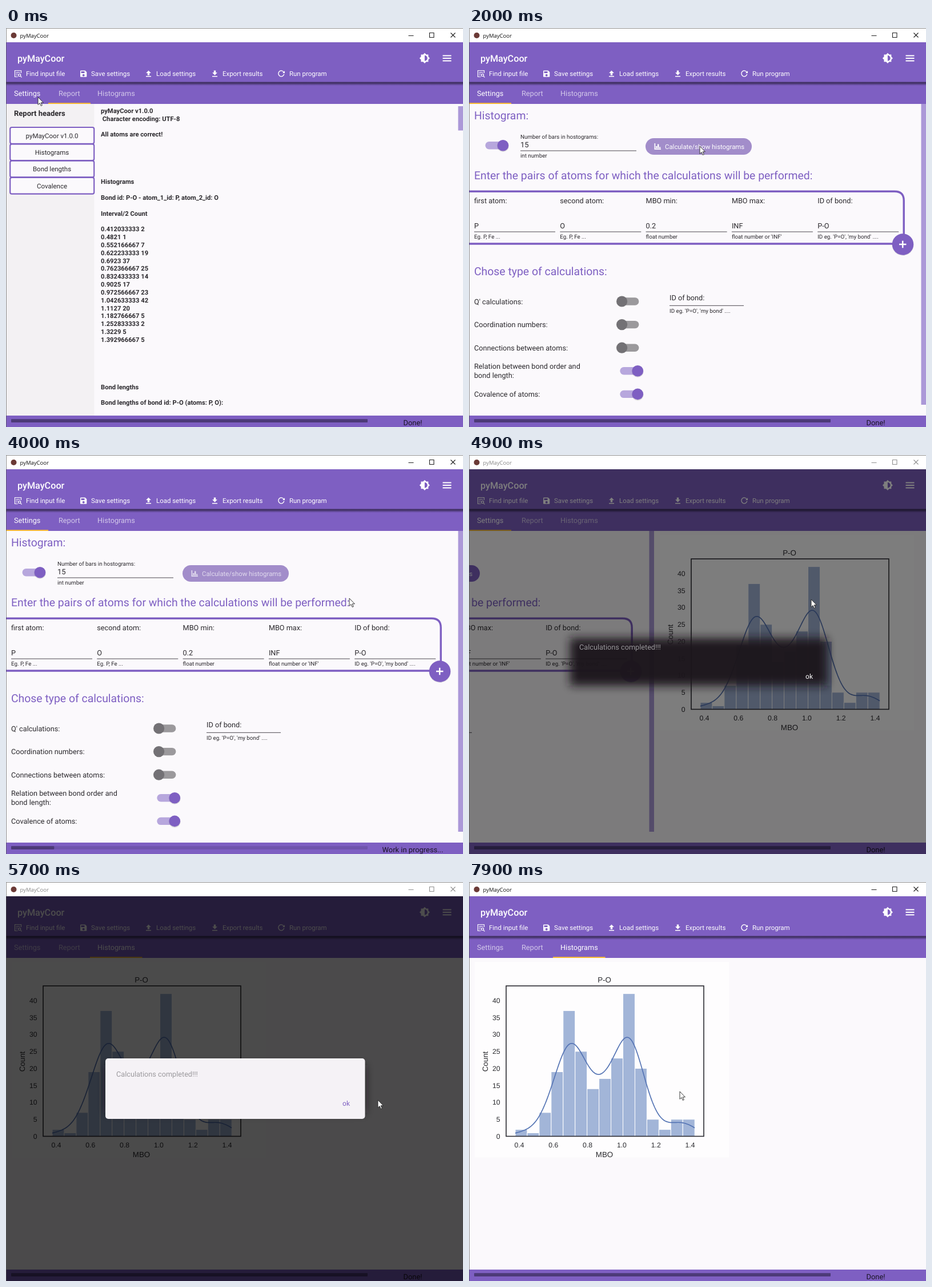
Write an HTML page that moves like this. It is 800x699 px and loops after 8000 ms.

```html
<!DOCTYPE html>
<html lang="en">
<head>
<meta charset="utf-8">
<title>pyMayCoor</title>
<style>
html, body { margin: 0; width: 100%; height: 100%; overflow: hidden; background: #fbf9fc; }
svg { display: block; width: 800px; height: 699px; font-family: Roboto, sans-serif; text-rendering: geometricPrecision; }
text { white-space: pre; }
.plot { font-family: "Liberation Sans", Arial, sans-serif; fill: #2a2a2e; }
</style>
</head>
<body>
<svg id="stage" viewBox="0 0 800 699"></svg>
<script>
const PURPLE = '#7e5fc2', PAPER = '#fbf9fc', INK = '#2b292d';
const LOOP = 8000;

const text = (x, y, s, size = 12.7, attrs = `fill="${INK}"`) =>
  `<text x="${x}" y="${y}" font-size="${size}" ${attrs}>${s}</text>`;
const rect = (x, y, w, h, fill, attrs = '') =>
  `<rect x="${x}" y="${y}" width="${w}" height="${h}" fill="${fill}" ${attrs}/>`;
const path = (d, attrs) => `<path d="${d}" ${attrs}/>`;
const circle = (x, y, r, fill, attrs = '') => `<circle cx="${x}" cy="${y}" r="${r}" fill="${fill}" ${attrs}/>`;
const line = (x, y, w) => rect(x, y - .5, w, 1.1, '#5d5a60');
const stroke = (color, width) => `fill="none" stroke="${color}" stroke-width="${width}"`;
const group = (id, body, attrs = '') => `<g id="${id}" ${attrs}>${body}</g>`;

// ---- window frame ----
function titleBar() {
  return rect(0, 0, 800, 25, '#fff') + circle(13.5, 13, 5, '#6b3a36') +
    group('caption',
      text(24.5, 16.5, 'pyMayCoor', 9.5, 'fill="#111" font-family="Open Sans, sans-serif"') +
      path('M704.5 13.5h9M741.5 8.5h7.5v8h-7.5zM778.5 8.5l8 8m0-8l-8 8', stroke('#222', 1.1)));
}

function toolbar() {
  const labels = [[35, 'Find input file'], [149, 'Save settings'], [263, 'Load settings'],
    [379, 'Export results'], [496, 'Run program']];
  const icons =
    path('M26.5 79v-4.5h-11v11h5M17.5 77.5h7M17.5 80h3M17.5 82.5h2M25.3 84.3l2.2 2.2', stroke('#fff', 1.2)) +
    circle(23.6, 82.4, 2.1, 'none', 'stroke="#fff" stroke-width="1.2"') +
    path('M131 74.5h7.5l2.8 2.8v7.4q0 1-1 1h-9.3q-1 0-1-1v-9.2q0-1 1-1zM131.5 76v3h6v-3zM135.7 80.7a2 2 0 1 0 .01 0z',
      'fill="#fff" fill-rule="evenodd"') +
    path('M249.5 74.5l4.4 4.6h-2.7v3.6h-3.4v-3.6h-2.7zM245 84h9v1.5h-9z' +
      'M365.5 82.7l-4.4-4.6h2.7v-3.6h3.4v3.6h2.7zM361 84h9v1.5h-9z', 'fill="#fff"') +
    path('M486.3 77.5a5 5 0 1 0 .5 3.2', stroke('#fff', 1.4)) + path('M484 79h4v-4z', 'fill="#fff"') +
    path('M12 18V6A6 6 0 0 1 18 12A6 6 0 0 1 12 18M20 15.31L23.31 12L20 8.69V4H15.31L12 .69L8.69 4H4V8.69L.69 12L4 15.31V20H8.69L12 23.31L15.31 20H20Z',
      'fill="#fff" fill-rule="evenodd" transform="translate(723.3 43.3) scale(.8)"') +
    path('M764.5 48.5h15M764.5 53h15M764.5 57.5h15', stroke('#fff', 1.8));
  return rect(0, 25, 800, 108, PURPLE) + rect(0, 94, 800, 7, 'url(#drop)') +
    text(20, 59, 'pyMayCoor', 16.2, 'fill="#fff" font-weight="500"') + icons +
    labels.map(([x, s]) => text(x, 84, s, 11.45, 'fill="#fff"')).join('') +
    [[14, 'Settings'], [92, 'Report'], [160, 'Histograms']]
      .map(([x, s], i) => text(x, 118.5, s, 12.7, `id="tab${i}" fill="#fff"`)).join('') +
    rect(0, 131, 74, 2, '#f5b636', 'id="marker"');
}

function statusBar() {
  return rect(0, 679, 800, 20, PURPLE) + rect(9, 685.3, 624, 5.6, '#6f54ac', 'rx="1"') +
    rect(9, 685.3, 624, 5.6, '#4c3a78', 'id="bar" rx="1"') +
    text(712, 696, 'Done!', 12.9, 'id="status" text-anchor="middle" fill="#1b1526"');
}

// ---- pages ----
const counts = [2, 1, 7, 19, 37, 25, 14, 17, 23, 42, 20, 5, 2, 5, 5];
const STEP = .2102 / 3, FIRST = .4821 - STEP;

function reportPage() {
  const rows = [[0, 'pyMayCoor v1.0.0'], [1, ' Character encoding: UTF-8'], [3, 'All atoms are correct!'],
    [9, 'Histograms'], [11, 'Bond id: P-O - atom_1_id: P, atom_2_id: O'], [13, 'Interval/2 Count'],
    ...counts.map((n, i) => [15 + i, +(FIRST + i * STEP).toFixed(9) + ' ' + n]),
    [35, 'Bond lengths'], [37, 'Bond lengths of bond id: P-O (atoms: P, O):']];
  return rect(0, 133, 800, 546, PAPER) + rect(0, 133, 154.5, 546, '#f3f1f3') +
    text(14, 154.3, 'Report headers', 13, `fill="${INK}" font-weight="700"`) +
    ['pyMayCoor v1.0.0', 'Histograms', 'Bond lengths', 'Covalence'].map((s, i) => {
      const y = 174 + i * 29.3;
      return rect(7.2, y, 147, 28.8, PAPER, `rx="3" stroke="${PURPLE}" stroke-width="2.2"`) +
        text(80.5, y + 18.7, s, 11.5, `fill="${INK}" text-anchor="middle"`);
    }).join('') +
    rows.map(([n, s]) => text(166, 149 + n * 13.82, s, 11.2, `fill="${INK}" font-weight="700"`)).join('') +
    rect(791.5, 137, 8.5, 42.5, '#ab98d8');
}

function toggle(x, y, on) {
  return on
    ? rect(x - 31, y - 6.7, 38, 13.4, '#b7a7dd', 'rx="6.7"') +
      circle(x, y + 1, 10.3, '#000', 'opacity=".13"') + circle(x, y, 9.8, PURPLE)
    : rect(x - 7, y - 6.7, 36.8, 13.4, '#9b999c', 'rx="6.7"') + circle(x, y, 9.6, '#737175');
}

function settingsPage() {
  const heading = (y, s) => text(9, y, s, 19.4, `fill="${PURPLE}"`);
  const fields = [['first atom:', 'P', 'Eg. P, Fe ...'], ['second atom:', 'O', 'Eg. P, Fe ...'],
    ['MBO min:', '0.2', 'float number'], ['MBO max:', 'INF', "float number or 'INF'"],
    ['ID of bond:', 'P-O', "ID eg. 'P=O', 'my bond' ...."]];
  const options = ["Q' calculations:", 'Coordination numbers:', 'Connections between atoms:', '', 'Covalence of atoms:'];
  return rect(0, 133, 800, 546, PAPER) + heading(160, 'Histogram:') +
    toggle(59.5, 205.8, true) +
    text(90, 193.6, 'Number of bars in hostograms:', 9.85) + text(90, 209, '15', 13) +
    line(90, 215, 203) + text(90, 227.4, 'int number', 9.75) +
    rect(309, 193, 186, 29, PURPLE, 'id="button" rx="14.5"') +
    group('buttonLabel', path('M324.5 202v11h11.5v-1.7h-9.8V202zM327 207h2.4v3.5H327zM330 203.5h2.4v7H330zM333 208.5h2.4v2H333z', '') +
      text(343, 211.8, 'Calculate/show histograms', 11.4, ''), 'fill="#fff"') +
    heading(265, 'Enter the pairs of atoms for which the calculations will be performed:') +
    path('M0 286.3H745Q761.2 286.3 761.2 302.3V378H0', stroke(PURPLE, 3.4)) +
    fields.map(([label, value, hint], i) => {
      const x = 9 + i * 150.3;
      return text(x, 307, label) + text(x, 350.5, value) + line(x, 357, 142) + text(x, 369, hint, 9.75);
    }).join('') +
    circle(759.5, 379.8, 19, '#000', 'opacity=".12"') + circle(759.5, 379, 18.7, PURPLE) +
    path('M753 379h12.4M759.2 372.8v12.4', stroke('#fff', 2.5)) +
    heading(433, 'Chose type of calculations:') +
    options.map((s, i) => text(9, 483.5 + i * 40.6, s) + toggle(i > 2 ? 295.3 : 267.6, 479 + i * 40.6, i > 2)).join('') +
    text(9, 597.2, 'Relation between bond order and') + text(9, 612.6, 'bond length:') +
    text(351, 477, 'ID of bond:') + line(351, 486.3, 130) +
    text(351, 498.5, "ID eg. 'P=O', 'my bond' ....", 9.75) +
    rect(791.5, 133, 8.5, 527, '#ab98d8');
}

function histogramPage() {
  const px = v => 88 + (v - .4) * 299, py = n => 445.5 - n * 5.95;
  const width = 314.2 / counts.length, H = .067;
  const density = v => counts.reduce((sum, n, i) =>
    sum + n * Math.exp(-(((v - FIRST - i * STEP) / H) ** 2) / 2), 0) * STEP / (H * Math.sqrt(2 * Math.PI));
  let curve = '';
  for (let x = 81; x <= 395; x += 2) curve += (curve ? 'L' : 'M') + x + ' ' + py(density(.4 + (x - 88) / 299)).toFixed(2);
  const label = (x, y, s, size, attrs = '') => text(x, y, s, size, `class="plot" text-anchor="middle" ${attrs}`);
  return rect(0, 133, 800, 546, PAPER) + rect(10, 140, 445, 342.5, '#fefdfe') +
    counts.map((n, i) => rect(81 + i * width, py(n), width, n * 5.95, '#a2b5d8', 'stroke="#fff" stroke-width="1"')).join('') +
    path(curve, stroke('#5574b4', 1.7)) +
    rect(65, 182, 346, 263.5, 'none', 'stroke="#2a2a30" stroke-width="1.6"') +
    [0, 5, 10, 15, 20, 25, 30, 35, 40].map(n => text(54.5, py(n) + 4.3, n, 12.2, 'class="plot" text-anchor="end"')).join('') +
    [.4, .6, .8, 1, 1.2, 1.4].map(v => label(px(v), 465, v.toFixed(1), 12.2)).join('') +
    label(237, 175.5, 'P-O', 13.3) + label(237, 482, 'MBO', 13.3) +
    label(0, 0, 'Count', 13.3, 'transform="translate(33 314.5) rotate(-90)"');
}

function dialog() {
  return rect(0, 25, 800, 674, '#000', 'id="dim"') +
    group('popup',
      rect(177, 321, 450, 83, '#1c191f', 'filter="url(#blur)" opacity=".97"') +
      rect(174, 309, 454.5, 106, '#f5f2f6', 'id="card" rx="5"') +
      text(193, 340.5, 'Calculations completed!!!', 12.7, 'fill="#9b999d"') +
      text(595.5, 391.8, 'ok', 12, 'id="ok" text-anchor="middle"'));
}

const stage = document.getElementById('stage');
stage.innerHTML =
  `<defs>
    <linearGradient id="drop" x2="0" y2="1"><stop stop-opacity=".1"/><stop offset=".25" stop-opacity=".55"/><stop offset="1" stop-opacity="0"/></linearGradient>
    <filter id="blur" x="-10%" y="-40%" width="120%" height="180%"><feGaussianBlur stdDeviation="8"/></filter>
    <clipPath id="view"><rect y="133" width="800" height="546"/></clipPath>
  </defs>` + rect(0, 0, 800, 699, PAPER) +
  `<g clip-path="url(#view)">` + group('page0', settingsPage()) + group('page1', reportPage()) +
  group('page2', histogramPage()) + '</g>' +
  toolbar() + statusBar() + dialog() + titleBar() +
  path('M.5 699V.5H800', 'fill="none" stroke="#555" stroke-opacity=".65"') +
  path('M0 0V13.4L3.1 10.6 5.2 15.4 7.3 14.5 5.2 9.8H9.4Z',
    'id="cursor" fill="#fff" stroke="#222" stroke-width=".9" stroke-linejoin="round"');

// ---- motion ----
const $ = id => document.getElementById(id);
const set = (id, attrs) => { for (const k in attrs) $(id).setAttribute(k, attrs[k]); };
const ramp = (t, start, length) => Math.min(1, Math.max(0, (t - start) / length));
const outQuad = p => p * (2 - p);
const mix = (a, b, p) => a + (b - a) * p;

const trail = [[0, 56, 121], [200, 56, 121], [700, 196, 226], [1000, 215, 228], [1750, 404, 207], [2350, 404, 207],
  [3600, 601, 251], [4400, 601, 251], [4900, 599, 253], [5150, 599, 253], [5700, 651, 382],
  [6300, 597, 385], [7250, 597, 385], [7850, 369, 367], [LOOP, 369, 367]];

function pointer(t) {
  const i = trail.findIndex(k => k[0] > t);
  const [t0, x0, y0] = trail[i - 1], [t1, x1, y1] = trail[i];
  const p = ramp(t, t0, t1 - t0), e = p * p * (3 - 2 * p);
  return `translate(${mix(x0, x1, e)} ${mix(y0, y1, e)})`;
}

function draw(t) {
  const toSettings = outQuad(ramp(t, 100, 300)), toPlot = outQuad(ramp(t, 4801, 275));
  const shift = [t < 4800 ? -800 * (1 - toSettings) : -800 * toPlot, 800 * toSettings, 800 * (1 - toPlot)];
  const active = t < 4950 ? 0 : 2;
  shift.forEach((x, i) => {
    set('page' + i, { transform: `translate(${x} 0)` });
    set('tab' + i, { 'fill-opacity': i === active ? 1 : .66 });
  });

  const back = outQuad(ramp(t, 200, 250)), ahead = outQuad(ramp(t, 4980, 200));
  set('marker', { x: t < 4900 ? 74 * (1 - back) : 147 * ahead, width: mix(74, 91.5, ahead) });

  const press = ramp(t, 1850, 120) * (t < 4600);
  set('button', { fill: press ? `color-mix(in srgb, #a28dca ${press * 100}%, ${PURPLE})` : PURPLE });
  set('buttonLabel', { opacity: t > 2200 && t < 4600 ? .68 : 1 });

  const busy = t >= 3400 && t < 4600;
  set('bar', { width: busy ? 624 * ramp(t, 3500, 1014) ** 3 : 624 });
  const status = busy ? 'Work in progress...' : 'Done!';
  if ($('status').textContent !== status) $('status').textContent = status;

  const close = 1 - ramp(t, 7150, 200);
  set('dim', { opacity: .7 * outQuad(ramp(t, 4825, 160)) * close });
  set('popup', { opacity: ramp(t, 4825, 70) * close });
  const card = ramp(t, 4920, 80);
  set('card', { opacity: card });
  set('ok', { fill: card > .5 ? PURPLE : '#fff' });

  set('caption', { opacity: t >= 4400 && t < 7150 ? .5 : 1 });
  set('cursor', { transform: pointer(t) });
}

const start = performance.now();
function tick() {
  draw((performance.now() - start) % LOOP);
  requestAnimationFrame(tick);
}
tick();
</script>
</body>
</html>
```
